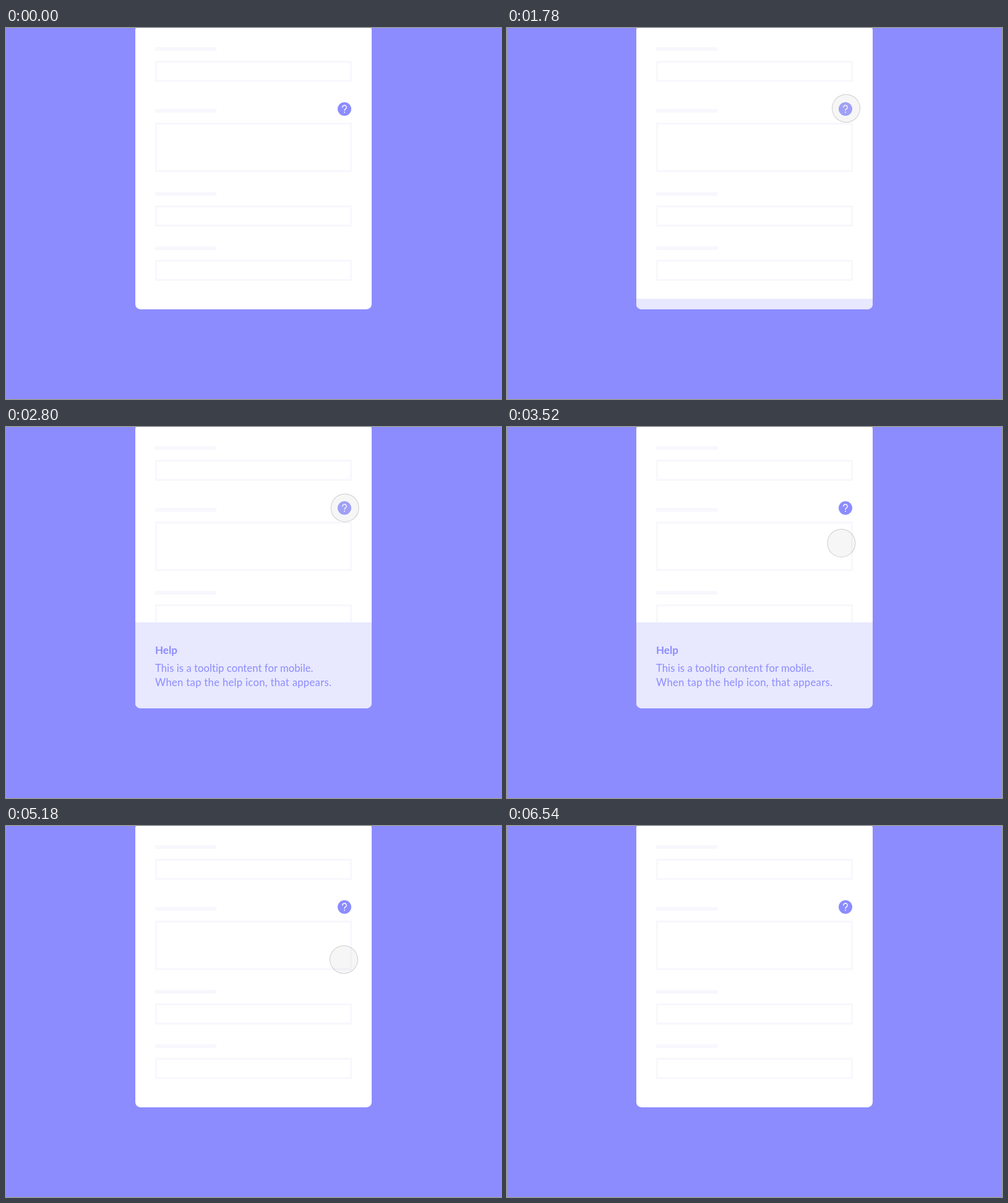
Recreate the animation shown at these times as an HTML page. Size 800 px wide and 600 px high, loop 7.24 s.

```html
<!DOCTYPE html>
<html lang="en">
<head>
<meta charset="utf-8">
<title>Help tooltip</title>
<style>
  :root {
    --violet: #8c8cff;
    --line: #f7f7fd;
    --loop: 7240ms;
    --enter: path("M753 -26 C720 220 582 113 548 130");
    --leave-icon: path("M548 130 C538 159 537 187 546 216");
    --exit: path("M546 216 L748 -28");
  }
  html, body {
    margin: 0;
    width: 100%;
    height: 100%;
    overflow: hidden;
    background: var(--violet);
  }
  .stage {
    position: relative;
    width: 800px;
    height: 600px;
    overflow: hidden;
  }
  svg { display: block; }
  .bar { fill: var(--line); }
  .field { fill: none; stroke: var(--line); stroke-width: 3; }
  .mark { fill: none; stroke: #fff; stroke-width: 1.4; stroke-linecap: round; }

  .panel { animation: panel var(--loop) linear infinite; }
  .panel text { fill: var(--violet); font: 16.6px Lato, sans-serif; }
  .panel .title { font-size: 17px; font-weight: 700; }
  .panel .first { letter-spacing: .08px; }
  .panel .second { letter-spacing: .33px; }

  .cursor {
    position: absolute;
    top: 0;
    left: 0;
    width: 46px;
    height: 46px;
    offset-anchor: 50% 50%;
    offset-rotate: 0deg;
    animation: travel var(--loop) linear infinite;
  }
  .cursor::before {
    content: "";
    position: absolute;
    inset: 0;
    border: 1px solid;
    border-radius: 50%;
    background-clip: padding-box;
    animation: press var(--loop) step-end infinite;
  }

  @keyframes panel {
    0%, 71.5%, 100% { transform: translateY(139px); }
    24.309% {
      transform: translateY(139px);
      animation-timing-function: cubic-bezier(.333, .667, .667, 1);
    }
    29.006% { transform: none; }
    68.232% {
      transform: none;
      animation-timing-function: cubic-bezier(.4, .1, .7, .9);
    }
  }

  /* Each path begins where the one before it ends. */
  @keyframes travel {
    0% { offset-path: var(--enter); offset-distance: 0%; }
    4.42% {
      offset-path: var(--enter);
      offset-distance: 0%;
      animation-timing-function: cubic-bezier(.333, 1, .667, 1);
    }
    14.641%, 30% { offset-path: var(--enter); offset-distance: 100%; }
    30.001% { offset-path: var(--leave-icon); offset-distance: 0%; }
    36.74% {
      offset-path: var(--leave-icon);
      offset-distance: 0%;
      animation-timing-function: cubic-bezier(.8, 0, .86, 1);
    }
    51.105%, 80% { offset-path: var(--leave-icon); offset-distance: 100%; }
    80.001% { offset-path: var(--exit); offset-distance: 0%; }
    86.188% {
      offset-path: var(--exit);
      offset-distance: 0%;
      animation-timing-function: cubic-bezier(.45, .15, .75, .7);
    }
    90.331%, 100% { offset-path: var(--exit); offset-distance: 100%; }
  }

  @keyframes press {
    0%, 20.925%, 68.439%, 100% {
      inset: 0;
      background-color: rgba(217, 217, 217, .25);
      border-color: rgba(151, 151, 151, .48);
    }
    14.848%, 64.019% {
      inset: 1px;
      background-color: rgba(217, 217, 217, .6);
      border-color: rgba(151, 151, 151, .95);
    }
  }
</style>
</head>
<body>
<div class="stage">
  <svg width="800" height="600" viewBox="0 0 800 600">
    <defs>
      <clipPath id="card"><rect x="209" y="-5" width="382" height="460" rx="8.5"/></clipPath>
    </defs>
    <g clip-path="url(#card)">
      <rect x="209" y="-5" width="382" height="460" fill="#fff"/>
      <g class="bar">
        <rect x="241" y="31" width="99" height="6"/>
        <rect x="241" y="131" width="99" height="6"/>
        <rect x="241" y="265" width="99" height="6"/>
        <rect x="241" y="353" width="99" height="6"/>
      </g>
      <g class="field">
        <rect x="242.5" y="54.5" width="315" height="31"/>
        <rect x="242.5" y="154.5" width="315" height="77"/>
        <rect x="242.5" y="288.5" width="315" height="31"/>
        <rect x="242.5" y="376.5" width="315" height="31"/>
      </g>
      <circle cx="547" cy="131" r="11" fill="#8c8cff"/>
      <path class="mark" d="M543.8 128.3 A3.2 3.1 0 1 1 549.4 130.2 C548.2 131.4 547 131.8 547 133.2"/>
      <circle cx="547" cy="136.3" r=".95" fill="#fff"/>
      <g class="panel">
        <rect x="209" y="316" width="382" height="140" fill="#e8e8ff"/>
        <text class="title" x="241" y="367">Help</text>
        <text class="first" x="241" y="396">This is a tooltip content for mobile.</text>
        <text class="second" x="241" y="419">When tap the help icon, that appears.</text>
      </g>
    </g>
  </svg>
  <div class="cursor"></div>
</div>
</body>
</html>
```
